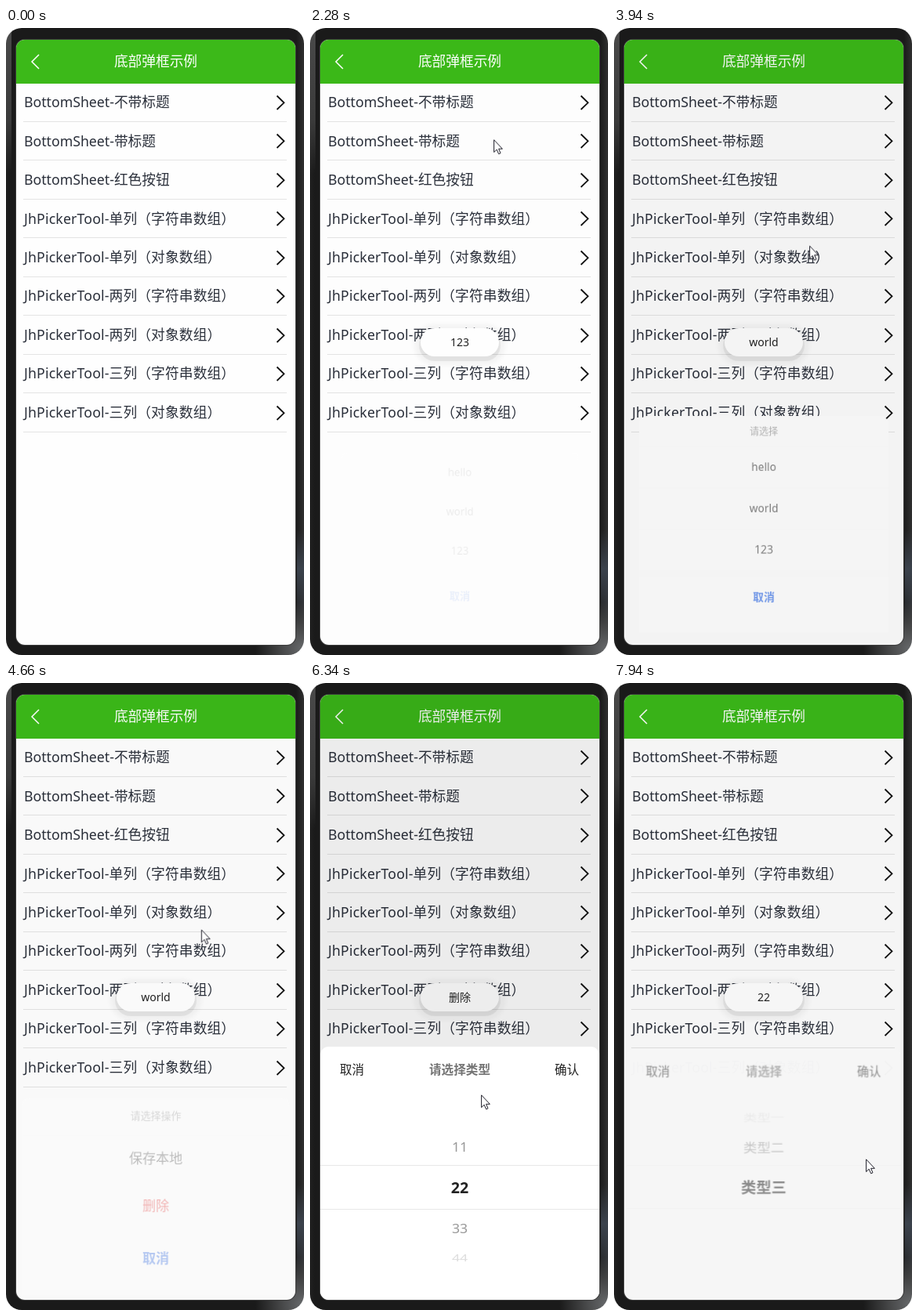
These frames come from a looping animation (380x800 px, 8 s). An HTML page:

```html
<!DOCTYPE html>
<html lang="zh-CN">
<head>
<meta charset="utf-8">
<title>底部弹框示例</title>
<style>
  html, body { margin: 0; width: 100%; height: 100%; overflow: hidden; background: #fff; }
  body { position: relative; font-family: "Noto Sans", "Noto Sans CJK SC", "Noto Sans CJK", sans-serif; }
  div, svg { position: absolute; }
  .phone {
    width: 380px; height: 800px; border-radius: 20px; overflow: hidden;
    background:
      radial-gradient(circle at 378px 792px, #66686a 0, #4a4b4c 24px, transparent 60px),
      linear-gradient(transparent 640px, #3b424c 690px, transparent 760px) 371px 0 / 9px 800px no-repeat,
      linear-gradient(#4a4a4a, #3a3a3a 120px, transparent 185px) 0 0 / 7px 800px no-repeat,
      linear-gradient(90deg, #202020, #1a1a1a 6px, #1a1a1a 370px, #303030);
  }
  .screen {
    left: 13px; top: 15px; width: 356px; height: 772px;
    border-radius: 11px; overflow: hidden; background: #fefefe; box-shadow: 0 0 0 1px #3c3c3c;
  }
  .stage { left: -13px; top: -15px; width: 380px; height: 800px; }
  .layer { inset: 0; }
  .text { line-height: 1; width: 300px; white-space: nowrap; }
  .mask { inset: 0; background: #000; }
  .panel { border-radius: 11px 11px 0 0; }
  .pill {
    left: 141px; top: 383px; width: 100px; height: 36px; border-radius: 18px; background: #fff;
    box-shadow: 0 4px 1px 2px rgba(0,0,0,.07), 0 3px 6px 8px rgba(0,0,0,.045);
  }
  svg { overflow: visible; fill: none; }
</style>
</head>
<body>
<div class="phone"><div class="screen"><div class="stage" id="stage"></div></div></div>
<script>
const LOOP = 8000, TICK = 20;
const INK = '#2f2f2f', GREY = '#858585', RED = '#de1414', BLUE = '#1656dc';
const stage = document.getElementById('stage');

function add(parent, cls, style = {}) {
  const el = document.createElement('div');
  el.className = cls;
  Object.assign(el.style, style);
  parent.append(el);
  return el;
}

const box = (parent, x, y, w, h, background, cls = '') =>
  add(parent, cls, { left: x + 'px', top: y + 'px', width: w + 'px', height: h + 'px', background });

function label(parent, text, x, y, size, color, weight = 400, textAlign = 'center') {
  const el = add(parent, 'text', {
    left: (textAlign === 'center' ? x - 150 : x) + 'px', top: y - size / 2 + 'px',
    fontSize: size + 'px', fontWeight: weight, color, textAlign
  });
  el.textContent = text;
  return el;
}

function icon(parent, x, y, d, stroke, width, fill = 'none') {
  parent.insertAdjacentHTML('beforeend',
    `<svg width="20" height="24" style="left:${x}px;top:${y}px">` +
    `<path d="${d}" stroke="${stroke}" stroke-width="${width}" fill="${fill}"/></svg>`);
  return parent.lastElementChild;
}

const clamp = v => Math.min(1, Math.max(0, v));
const ramp = (t, start, span) => clamp((t - start) / span);
const smooth = p => p * p * (3 - 2 * p);
const easeOut = (p, power) => 1 - (1 - p) ** power;

// Samples a style function of time into keyframes
function play(el, style) {
  const frames = [];
  for (let t = 0; t <= LOOP; t += TICK) frames.push(style(t));
  el.animate(frames, { duration: LOOP, iterations: Infinity });
}

// Page
box(stage, 13, 15, 356, 55.5, '#3cb919');
icon(stage, 32, 34, 'M10 0 1 9 10 18', '#fff', 1.5);
label(stage, '底部弹框示例', 191, 42.5, 17.7, '#fff');

const rowY = i => 95 + 49.45 * i;
const items = ['不带标题', '带标题', '红色按钮'].map(s => 'BottomSheet-' + s);
for (const n of ['单列', '两列', '三列'])
  for (const kind of ['字符串数组', '对象数组']) items.push(`JhPickerTool-${n}（${kind}）`);

items.forEach((s, i) => {
  const y = rowY(i);
  const text = label(stage, s, 23, y, 17.7, '#2b303b', 400, 'left');
  if (s.startsWith('Jh')) text.style.letterSpacing = '.16px';
  icon(stage, 345, y - 9, 'M.5 .5 9.5 9.3 .5 18', '#111', 1.8);
  box(stage, 22, Math.round(y + 24), 336, 1, '#e4e4e4');
});

// Sheet contents: text goes to body, separators to rules; both return the sheet's top edge
const line = (rules, y) => box(rules, 13, y, 356, 1, '#e8e8e8');

function actions(body, rules, { title, rows, rowH = 59, titleH = 43, size = 15.4 }) {
  const end = 699, first = end - rows.length * rowH;
  rows.forEach((s, i) => {
    const y = first + i * rowH;
    label(body, s, 191, y + rowH / 2, size, s === '删除' ? RED : INK);
    if (i || title) line(rules, y);
  });
  box(rules, 13, end, 356, 10, '#ededed');
  label(body, '取消', 191, 738, size, BLUE, 700);
  if (!title) return first;
  label(body, title, 191, first - titleH / 2, 13.5, GREY);
  return first - titleH;
}

function picker(body, rules, { title, wheel, picked }) {
  label(body, '取消', 53.5, 494, 15.5, '#222', 500);
  label(body, title, 191, 494, 15.6, '#747474', 700);
  label(body, '确认', 327.5, 494, 15.5, '#222', 500);
  line(body, 615);
  line(body, 671);
  wheel.forEach((s, i) => {
    const k = i - picked, far = Math.abs(k);
    const y = 644 + 104 * Math.sin(k * Math.PI / 6);
    const color = ['#222', '#999', '#ddd'][far];
    label(body, s, 191, y, far ? 17.7 : 19.6, color, far ? 400 : 600)
      .style.transform = `scaleY(${1 - .08 * far * far})`;
  });
  return 464;
}

const basic = ['hello', 'world', '123'];
const sheets = [
  { open: 780, close: 2070, reply: '123', rows: basic },
  { open: 2830, close: 3820, reply: 'world', title: '请选择', rows: basic },
  { open: 4600, close: 5410, reply: '删除', title: '请选择操作', rows: ['保存本地', '删除'],
    rowH: 62.5, titleH: 50, size: 17.8 },
  { open: 6120, close: 7140, reply: '22', title: '请选择类型', wheel: ['11', '22', '33', '44'], picked: 1 },
  { open: 7840, close: Infinity, title: '请选择', wheel: ['类型一', '类型二', '类型三'], picked: 2 }
];

// Toasts answer a closing sheet and lie below the next one
for (const { close, reply } of sheets.filter(s => s.reply)) {
  const toast = add(stage, 'layer');
  add(toast, 'pill');
  label(toast, reply, 191, 401, 14, '#222');
  play(toast, t => {
    const shown = ramp(t, close, 120);
    return {
      opacity: shown - ramp(t, close + 1000, 110),
      transform: `translateY(${6 * (1 - shown)}px)`
    };
  });
}

for (const sheet of sheets) {
  const { open, close } = sheet;
  const mask = add(stage, 'mask');
  const group = add(stage, 'layer');
  const panel = add(group, 'panel');
  const rules = add(group, 'layer');
  const body = add(group, 'layer');
  const top = (sheet.wheel ? picker : actions)(body, rules, sheet);
  Object.assign(panel.style, { left: '13px', top: top + 'px', width: '356px', height: 787 - top + 'px' });
  group.style.transformOrigin = `191px ${(top + 787) / 2}px`;

  const alpha = t => ramp(t, open, 200) * (1 - smooth(ramp(t, close + 25, 225)));
  const scale = t => .9 + .1 * easeOut(ramp(t, open, 200), 2.5) - .15 * smooth(ramp(t, close, 188));

  play(mask, t => ({ opacity: .07 * alpha(t) }));
  play(group, t => ({ transform: `scale(${scale(t)})` }));
  play(body, t => ({ opacity: alpha(t) }));
  play(rules, t => ({ opacity: alpha(t) ** 4 }));
  play(panel, t => {
    const a = alpha(t), c = Math.round(255 - 18 * a * (1 - a ** 6));
    return { opacity: easeOut(a, 6), backgroundColor: `rgb(${c},${c},${c})` };
  });
}

// Pointer: each hop starts at a time, lasts a span and ends at a place
const hops = [
  [80, 480, 219, 76], [760, 520, 282, 479], [1300, 260, 230, 601], [1600, 280, 222, 676],
  [2040, 300, 234, 141], [2850, 600, 225, 608],
  [3780, 520, 256, 180], [4620, 520, 230, 660],
  [5300, 600, 238, 244], [6100, 240, 218, 525], [6400, 500, 330, 502],
  [7100, 520, 255, 285], [7820, 120, 321, 607]
];
const pointer = icon(stage, 0, 0, 'M.6 .8V16.6L4.2 13.2 6.6 18.8 9 17.8 6.6 12.3H11.4Z', '#1d1d28', 1, '#fff');
play(pointer, t => {
  let x = 107, y = 346;
  for (const [start, span, toX, toY] of hops) {
    const p = easeOut(ramp(t, start, span), 4);
    x += (toX - x) * p;
    y += (toY - y) * p;
  }
  return { transform: `translate(${x}px,${y}px)`, opacity: t < hops[0][0] ? 0 : 1 };
});
</script>
</body>
</html>
```
